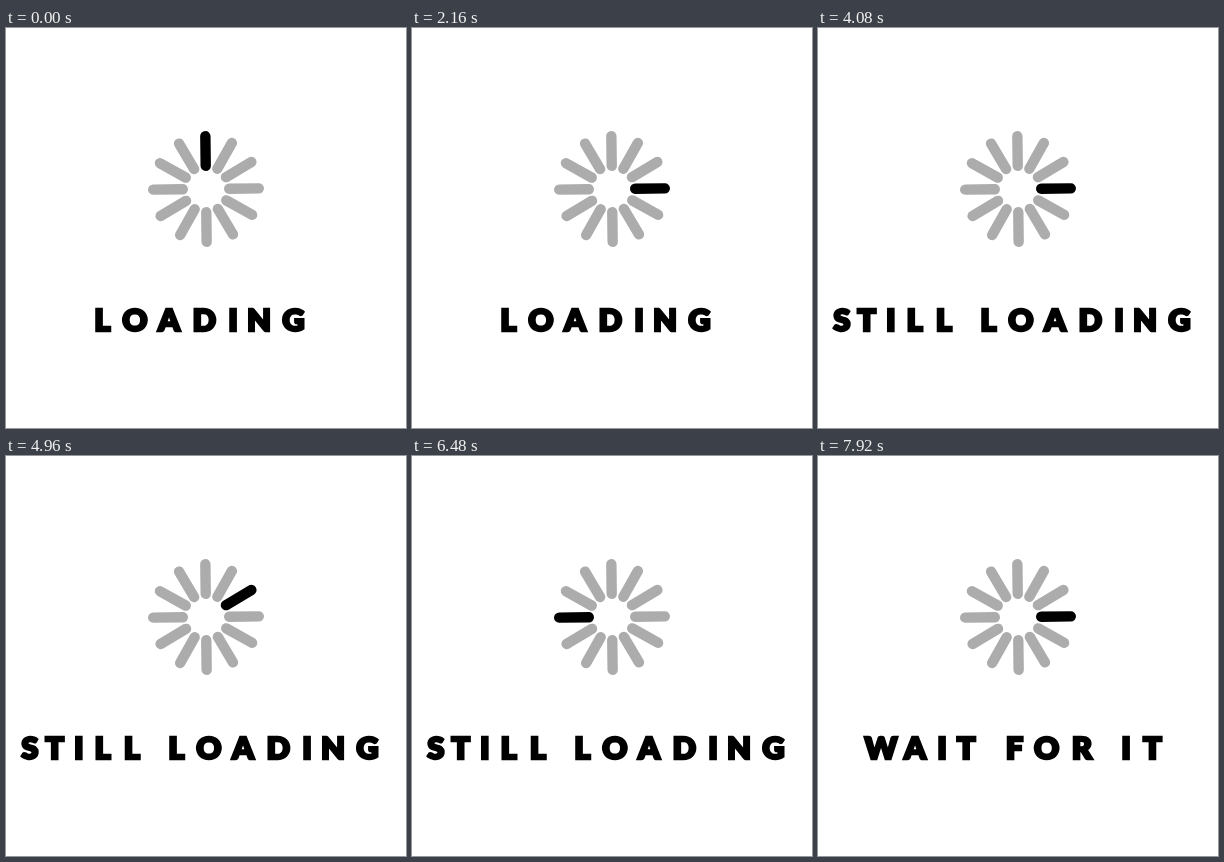
These frames come from a looping animation (400x400 px, 8 s). An HTML page:

```html
<!DOCTYPE html>
<html lang="en">
<head>
<meta charset="utf-8">
<title>Loading</title>
<style>
  html, body { margin: 0; width: 100%; height: 100%; overflow: hidden; background: #fff; }
  svg { display: block; width: 100vw; height: 100vh; }
  line { stroke-width: 10.4; stroke-linecap: round; }
  text {
    font: 900 31px Lato, "Open Sans", sans-serif;
    font-kerning: none;
    font-variant-ligatures: none;
    text-anchor: middle;
    stroke: #000;
    stroke-width: 2.4;
  }
</style>
</head>
<body>
<svg viewBox="0 0 400 400">
  <g id="spinner" transform="translate(200 161) rotate(-0.7)"></g>
  <text id="caption" y="303.4"></text>
</svg>
<script>
const STEP = 80, SPOKES = 12, LOOP = 8000;
const TURN = STEP * SPOKES;

// Letter centres, one per character.
const loading = [96.3, 128.8, 163, 198.3, 227, 253, 287.5];
const captions = [
  { from: 0, text: "LOADING", x: loading },
  { from: TURN * 4, text: "STILL LOADING",
    x: [23.8, 48.8, 72.8, 96.7, 125.8, 148, ...loading.map(x => x + 74)] },
  { from: TURN * 8, text: "WAIT FOR IT",
    x: [63, 97, 124, 148.3, 173, 196.5, 228.5, 264, 290, 308, 334.5] }
];

const spinner = document.getElementById("spinner");
const caption = document.getElementById("caption");

const spokes = Array.from({ length: SPOKES }, (_, i) => {
  const line = document.createElementNS("http://www.w3.org/2000/svg", "line");
  line.setAttribute("y1", -52.8);
  line.setAttribute("y2", -23.2);
  line.setAttribute("transform", `rotate(${i * 360 / SPOKES})`);
  return spinner.appendChild(line);
});

let shown = null;

function render(time) {
  const t = time % LOOP;
  const active = Math.floor(t / STEP) % SPOKES;
  spokes.forEach((s, i) => s.setAttribute("stroke", i === active ? "#000" : "#acacac"));

  const current = captions.findLast(c => t >= c.from);
  if (current !== shown) {
    shown = current;
    caption.setAttribute("x", current.x.join(" "));
    caption.textContent = current.text;
  }
}

let start = null;
function tick(now) {
  start ??= now;
  render(now - start);
  requestAnimationFrame(tick);
}
render(0);
requestAnimationFrame(tick);
</script>
</body>
</html>
```
